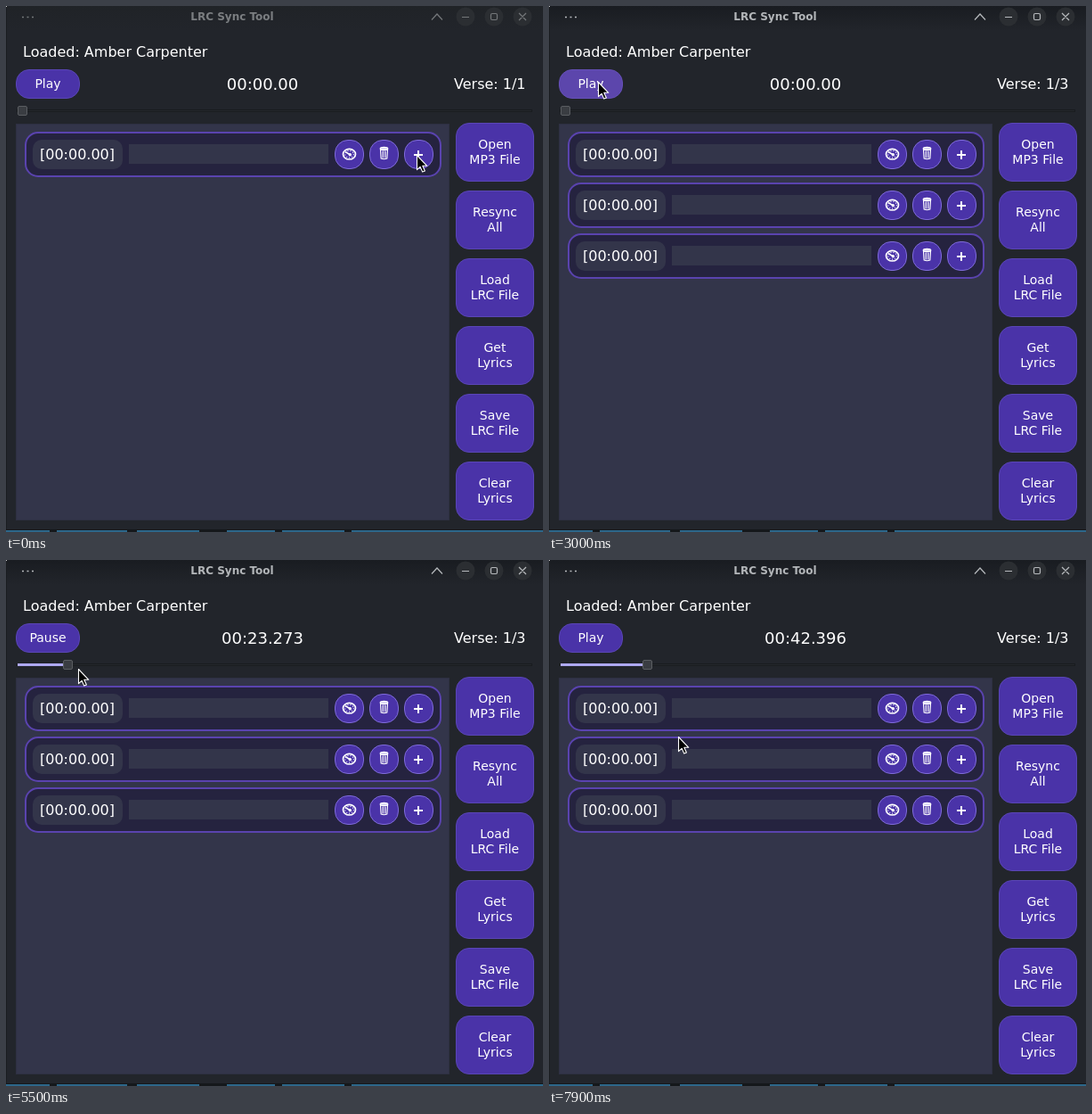
Recreate the animation shown at these times as an HTML page. Size 603 by 590 pixels, loop 8 s.

```html
<!DOCTYPE html>
<html lang="en">
<head>
<meta charset="utf-8">
<title>LRC Sync Tool</title>
<style>
  html, body { margin: 0; width: 100%; height: 100%; overflow: hidden; background: #22252b; }
  svg { display: block; width: 603px; height: 590px; }
  text { font: 16px "DejaVu Sans", sans-serif; fill: #fff; white-space: pre; }
  .mid { text-anchor: middle; }
  .small { font-size: 14px; }
  .clock { font-size: 18px; }
  .title { font-size: 12px; font-weight: bold; fill: var(--title); }
  .window-icons { fill: none; stroke: var(--icon); stroke-width: 1.2; }
  .button { fill: #4a33a8; stroke: #5a46b6; }
  .field { fill: #33354a; }
  .icon { fill: none; stroke: #fff; stroke-width: 1.2; }
  #stage { --title: #7b7e81; --icon: #74777a; --bar: #202327; }
  #stage.active { --title: #b3b6b9; --icon: #b6b9bc; --bar: #191c21; }
  #play.hover { fill: #5c46ac; stroke: #6650b8; }
  #play.pressed { fill: #3c2a8a; stroke: #5a46b6; }
</style>
</head>
<body>
<svg id="stage" viewBox="0 0 603 590">
  <defs>
    <linearGradient id="bar" x2="0" y2="1">
      <stop style="stop-color: var(--bar)"/>
      <stop offset="1" stop-color="#22252b"/>
    </linearGradient>
    <rect id="round" x="369.5" y="150.5" width="32" height="32" rx="14.5" fill="#4a33a8" stroke="#7f6bd9"/>
    <circle id="dot" cy="12" r="10.5" fill="#2b2e32"/>
    <g id="row">
      <rect x="22" y="142" width="466" height="49" rx="14" fill="#25233f" stroke="#5a43af" stroke-width="2"/>
      <rect class="field" x="30" y="150" width="101" height="33" rx="10"/>
      <text class="mid" x="80" y="172">[00:00.00]</text>
      <rect class="field" x="138" y="155" width="224" height="22"/>
      <use href="#round"/>
      <use href="#round" x="39"/>
      <use href="#round" x="78"/>
      <g class="icon">
        <ellipse cx="385.5" cy="166.2" rx="7" ry="5.8" stroke-width="1.7"/>
        <ellipse cx="385.5" cy="166.2" rx="4.8" ry="3.9" stroke-dasharray="1 2"/>
        <path d="M381 163.500L386 166.700" stroke-width="1.6"/>
        <circle cx="386.3" cy="166.8" r="1.1" fill="#fff"/>
        <path d="M420.500 161L421.200 171Q424.500 172.500 427.800 171L428.500 161M423.300 162.500V170.500M425.800 162.500V170.500"/>
        <ellipse cx="424.5" cy="160" rx="4.3" ry="1.6" fill="#dcd8f4"/>
        <path d="M458 167H468M463 162V172" stroke-width="2"/>
      </g>
    </g>
  </defs>

  <rect width="603" height="590" fill="#22252b"/>
  <rect width="603" height="28" fill="url(#bar)"/>
  <rect width="1" height="590" fill="#1a1d21"/>
  <rect width="1" height="1" fill="#ccc"/>
  <use href="#dot" x="516"/>
  <use href="#dot" x="548"/>
  <use href="#dot" x="580"/>
  <g class="window-icons">
    <path d="M18 12.500H31" stroke-width="1.5" stroke-dasharray="2 3.5"/>
    <path d="M478 15.500L484 9L490 15.500M512 12.500H520M576 8L584 16M584 8L576 16"/>
    <rect x="544.5" y="8.5" width="7" height="7" rx="1.5"/>
  </g>
  <text class="title mid" x="254" y="16">LRC Sync Tool</text>

  <text x="19" y="57">Loaded: Amber Carpenter</text>
  <rect id="play" class="button" x="11.5" y="71.5" width="71" height="32" rx="14.5"/>
  <text id="playText" class="small mid" x="47" y="92"></text>
  <text id="clock" class="clock mid" x="288" y="94"></text>
  <text id="verse" x="503" y="93"></text>

  <rect x="12.5" y="116.5" width="578" height="2" fill="#24272c" stroke="#191c1f"/>
  <rect id="fill" x="13" y="116" height="3" fill="#aea9f2"/>
  <rect id="knob" y="112.5" width="10" height="10" rx="1.5" fill="#3a3d42" stroke="#5a5d61"/>

  <rect x="11.5" y="132.5" width="486" height="444" fill="#33354a" stroke="#2e3042"/>
  <use href="#row"/>
  <use href="#row" id="row2" y="57"/>
  <use href="#row" id="row3" y="114"/>
  <g id="side"></g>

  <rect y="587" width="603" height="3" fill="#15181b"/>
  <path d="M0 589H49M57 589H136M147 589H217M248 589H302M310 589H380M388 589H603" stroke="#2d678a" stroke-width="2"/>

  <path id="cursor" d="M0 0V16.200L3.600 12.800L6.200 18.600L8.900 17.400L6.300 11.800H11.300Z" stroke="#fff" stroke-width="1.1" stroke-linejoin="round"/>
</svg>
<script>
  const LOOP = 8000, STEP = 100;
  const el = id => document.getElementById(id);

  const labels = ["Open|MP3 File", "Resync|All", "Load|LRC File", "Get|Lyrics", "Save|LRC File", "Clear|Lyrics"];
  el("side").innerHTML = labels.map((label, i) => {
    const [top, bottom] = label.split("|"), y = 131 + 76 * i;
    return `<rect class="button" x="505.5" y="${y + .5}" width="87" height="65" rx="14.5"/>
      <text class="small mid" x="549" y="${y + 29}">${top}</text>
      <text class="small mid" x="549" y="${y + 46}">${bottom}</text>`;
  }).join("");

  const progress = (t, from, to) => Math.min(1, Math.max(0, (t - from) / (to - from)));
  const linear = u => u;
  const easeOut = u => 1 - (1 - u) ** 3;

  const plus = { x: 462, y: 168 }, play = { x: 56, y: 86 }, knobTip = { x: 21, y: 126 };
  const dragEnd = { x: 112, y: 121 }, rest = { x: 146, y: 199 };

  function pointer(t) {
    let { x, y } = plus;
    const glide = (spot, from, to, ease) => {
      const u = ease(progress(t, from, to));
      x += (spot.x - x) * u;
      y += (spot.y - y) * u;
    };
    glide(play, 1900, 2600, easeOut);
    glide(knobTip, 3800, 4500, easeOut);
    glide(dragEnd, 4700, 5900, linear);
    glide(play, 6450, 6700, easeOut);
    glide(rest, 7700, 7900, linear);
    return { x: Math.round(x), y: Math.round(y) };
  }

  // Song position in ms: real-time play, a drag that gathers speed, then play until paused
  function songTime(t) {
    const dragFrom = 4800, dragTo = 5900, seekFrom = 1767, seekTo = 40839;
    if (t < 3100) return 0;
    if (t < dragFrom) return seekFrom + t - dragFrom;
    if (t < dragTo) return Math.round(seekFrom + (seekTo - seekFrom) * progress(t, dragFrom, dragTo) ** 1.321);
    return Math.min(seekTo + t - dragTo, 42396);
  }

  function format(ms) {
    if (!ms) return "00:00.00";
    const pad = (n, size) => String(n).padStart(size, "0");
    return `00:${pad(Math.floor(ms / 1000), 2)}.${pad(ms % 1000, 3)}`;
  }

  function draw(t) {
    const rows = t < 700 ? 1 : t < 1600 ? 2 : 3;
    const { x, y } = pointer(t);
    const song = songTime(t), knob = Math.round(song * .00218);
    const pressed = (t >= 2800 && t < 3000) || (t >= 7400 && t < 7500);
    const over = x < 83 && y < 104;

    el("stage").classList.toggle("active", t >= 500);
    el("row2").style.display = rows > 1 ? "" : "none";
    el("row3").style.display = rows > 2 ? "" : "none";
    el("verse").textContent = "Verse: 1/" + rows;
    el("clock").textContent = format(song);
    el("playText").textContent = t >= 3100 && t < 7500 ? "Pause" : "Play";
    el("play").classList.toggle("hover", over && !pressed);
    el("play").classList.toggle("pressed", pressed);
    el("knob").setAttribute("x", 13.5 + knob);
    el("fill").setAttribute("width", knob);
    el("cursor").setAttribute("transform", `translate(${x - .5} ${y - .5})`);
  }

  const start = performance.now();
  function tick() {
    const t = (performance.now() - start) % LOOP;
    draw(Math.floor(t / STEP) * STEP);
    requestAnimationFrame(tick);
  }
  tick();
</script>
</body>
</html>
```
